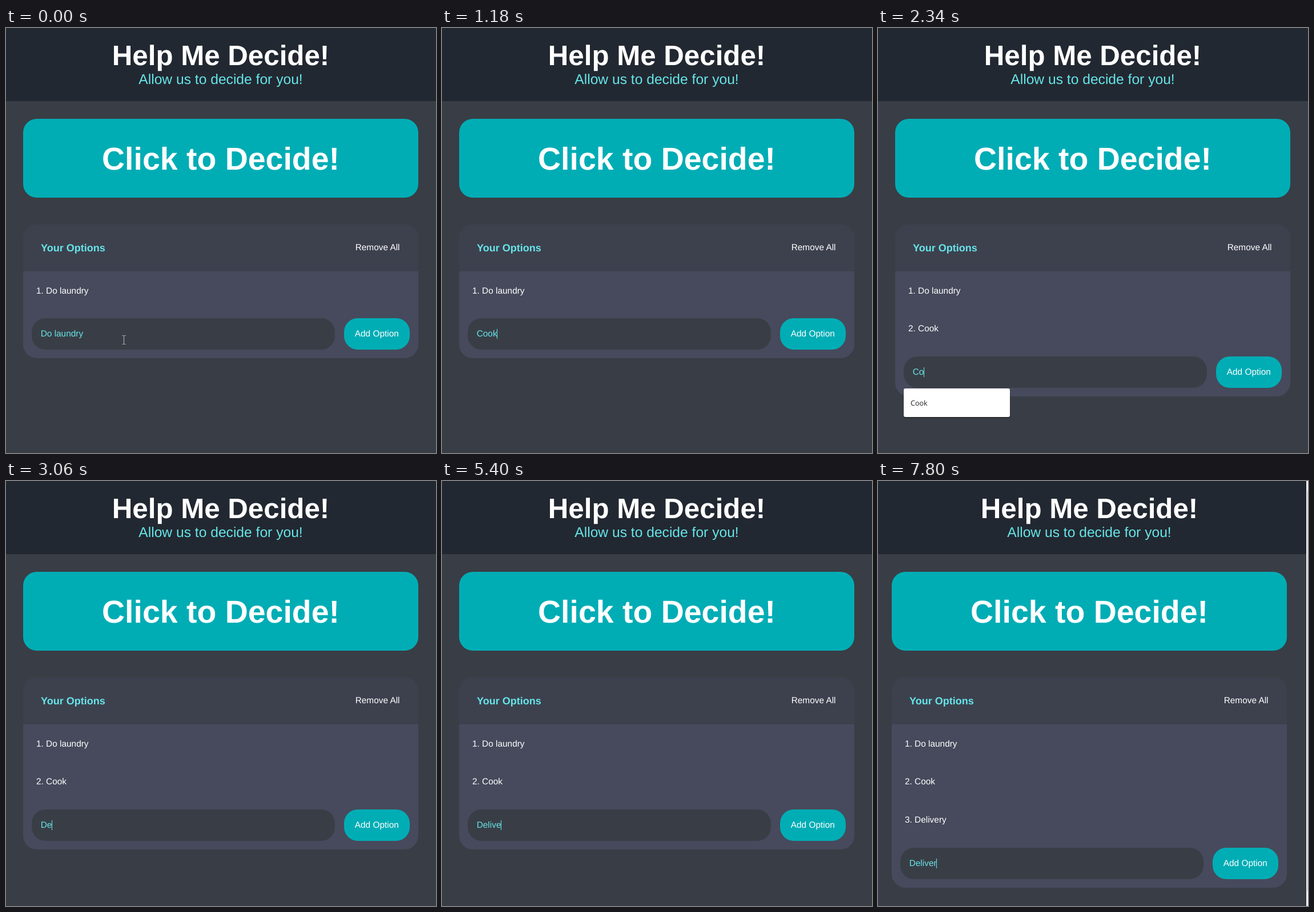
These frames come from a looping animation (753 by 744 pixels, 8000 ms). An HTML page:

```html
<!DOCTYPE html>
<html lang="en">
<head>
<meta charset="utf-8">
<title>Help Me Decide!</title>
<style>
  html { font-size: 15.4px; }
  html, body { margin: 0; width: 100%; height: 100%; overflow: hidden; background: #393d45; }
  svg { display: block; width: 753px; height: 744px; }
  text {
    font: 1rem "Liberation Sans", Arial, sans-serif;
    text-rendering: geometricPrecision;
    white-space: pre;
    fill: #fff;
  }
  .bold { font-weight: bold; }
  .mid { text-anchor: middle; }
  .cyan { fill: #66e5e9; }
  .menu text { font: 12.5px "Open Sans", "Noto Sans", sans-serif; fill: #222; }
</style>
</head>
<body>
<svg viewBox="0 0 753 744">
  <defs><clipPath id="picked"><rect id="pickedBox" y="527" height="18"/></clipPath></defs>
  <rect width="753" height="744" fill="#393d45"/>
  <rect width="753" height="128" fill="#222831"/>
  <g id="page">
    <text class="bold mid" x="376" y="65" style="font-size:3.2rem">Help Me Decide!</text>
    <text class="mid cyan" x="376" y="98" style="font-size:1.6rem">Allow us to decide for you!</text>
    <rect x="30" y="159" width="692" height="138" rx="24" fill="#00adb5"/>
    <text class="bold mid" x="376" y="248" style="font-size:3.6rem">Click to Decide!</text>

    <rect id="panel" x="30" y="344" width="692" rx="24" fill="#464a5c"/>
    <path d="M30 426V368a24 24 0 0 1 24-24H698a24 24 0 0 1 24 24V426z" fill="#3d414e"/>
    <text class="bold cyan" x="61" y="391" style="font-size:1.17rem">Your Options</text>
    <text x="611.7" y="389">Remove All</text>
    <g id="list"></g>

    <g id="form">
      <rect x="45" y="508" width="531" height="55" rx="24" fill="#393e46"/>
      <rect x="592" y="508" width="115" height="55" rx="24" fill="#00adb5"/>
      <text x="610.8" y="540">Add Option</text>
      <text id="field" class="cyan" x="60.7" y="540"></text>
      <path id="squiggle" fill="none" stroke="#d8343c"/>
      <rect id="caret" y="527" width="1" height="17" fill="#66e5e9"/>
      <g id="selection" clip-path="url(#picked)">
        <rect x="55" y="527" width="90" height="18" fill="#0078d7"/>
        <text x="60.7" y="540">Do laundry</text>
      </g>
      <g class="menu" id="menu">
        <rect id="menuShade" x="44.5" y="564.5" width="187" rx="4" fill="#000" opacity=".3"/>
        <rect id="menuBox" x="45" y="564" width="186" rx="3" fill="#fff"/>
        <text id="entry0" x="57" y="594"></text>
        <text id="entry1" x="57" y="628"></text>
      </g>
    </g>
    <path id="pointer" d="M-3-7.5H-1Q0-7.5 0-6.5Q0-7.5 1-7.5H3M0-6.5V6.5M-3 7.5H-1Q0 7.5 0 6.5Q0 7.5 1 7.5H3" fill="none" stroke="#b9bcc0"/>
  </g>
  <g id="scrollbar">
    <rect x="750" width="3" height="744" fill="#f1f1f1"/>
    <rect x="752" y="17" width="1" height="701" fill="#c1c1c1"/>
  </g>
</svg>
<script>
const LOOP = 8000, ROW = 67, LEFT = 60.7;
const $ = id => document.getElementById(id);
const options = ["Do laundry", "Cook", "Delivery"];

// [time, field text, caret shown, option count, suggestions]
const steps = [
  [0, "Do laundry", 0, 1],
  [60, "Do laundry", 0, 1, "Do laundry"],
  [860, "C", 1, 1],
  [900, "C", 1, 1, "Cook", "Clean"],
  [980, "Co", 1, 1, "Cook", "Clean"],
  [1010, "Co", 1, 1, "Cook"],
  [1090, "Coo", 1, 1, "Cook"],
  [1180, "Cook", 1, 1],
  [1400, "Cook", 1, 2],
  [1700, "Cook", 0, 2],
  [1850, "Coo", 0, 2],
  [1880, "Coo", 0, 2, "Cook"],
  [2220, "Coo", 1, 2, "Cook"],
  [2340, "Co", 1, 2, "Cook"],
  [2390, "", 1, 2],
  [2730, "D", 1, 2],
  [2780, "D", 1, 2, "Do laundry"],
  [3060, "De", 1, 2],
  [3120, "Del", 1, 2],
  [3210, "Deli", 1, 2],
  [3300, "Deliv", 1, 2],
  [3490, "Delive", 1, 2],
  [3540, "Deliveyr", 1, 2],
  [3720, "Deliveyr ", 1, 2],
  [3880, "Deliveyr F", 1, 2],
  [4030, "Deliveyr Fo", 1, 2],
  [4180, "Deliveyr Foo", 1, 2],
  [4270, "Deliveyr Food", 1, 2],
  [4760, "Deliveyr Food", 0, 2],
  [4820, "Deliveyr Foo", 1, 2],
  [5250, "Deliveyr Fo", 1, 2],
  [5280, "Deliveyr F", 1, 2],
  [5310, "Deliveyr ", 1, 2],
  [5340, "Deliveyr", 1, 2],
  [5370, "Delivey", 1, 2],
  [5400, "Delive", 1, 2],
  [5740, "Delivey", 1, 2],
  [5830, "Delive", 1, 2],
  [6360, "Delive", 0, 2],
  [6400, "Deliver", 1, 2],
  [6440, "Delivery", 1, 2],
  [6970, "Delivery", 0, 2],
  [7030, "Delivery", 0, 3],
  [7490, "Delivery", 1, 3],
  [7800, "Deliver", 1, 3]
];

$("list").innerHTML = options.map((name, i) =>
  `<text x="53" y="${465 + Math.floor(i * 66.5)}">${i + 1}. ${name}</text>`).join("");

const show = (id, on) => $(id).setAttribute("display", on ? "inline" : "none");
const set = (id, name, value) => $(id).setAttribute(name, value);

function textWidth(text) {
  $("field").textContent = text;
  return text ? $("field").getComputedTextLength() : 0;
}

function drawMenu(entries) {
  const height = 16 + 34 * entries.length;
  show("menu", entries.length);
  set("menuShade", "height", height + 1.5);
  set("menuBox", "height", height);
  for (const i of [0, 1]) $("entry" + i).textContent = entries[i] || "";
}

// The pointer drags left across the field and selects the text it passes.
function drawDrag(t) {
  const progress = t < 30 ? 0 : Math.min(1, (Math.floor((t - 30) / 25) + 1) / 8);
  const x = 206 - 214 * progress;
  set("pointer", "transform", `translate(${Math.round(x) + .5} 546)`);
  show("pointer", progress < 1);

  const end = LEFT + textWidth("Do laundry");
  const start = Math.max(LEFT, Math.min(end, x));
  set("pickedBox", "x", start);
  set("pickedBox", "width", end - start);
  show("selection", t < 860 && start < end);
}

function draw(t) {
  const [, text, caret, count, ...entries] = steps.findLast(step => step[0] <= t);
  const scrolled = count === 3;
  const drop = (count - 1) * ROW;

  drawDrag(t);
  drawMenu(entries);

  const misspelt = t >= 3720 && text.startsWith("Deliveyr");
  show("squiggle", misspelt);
  if (misspelt) {
    const waves = Math.floor(textWidth("Deliveyr") / 4);
    set("squiggle", "d", `M${LEFT} 543` + "l2-1.5l2 1.5".repeat(waves));
  }

  set("caret", "x", Math.round(LEFT + textWidth(text) - .2));
  show("caret", caret);

  [...$("list").children].forEach((row, i) => row.setAttribute("display", i < count ? "inline" : "none"));
  set("panel", "height", 234 + drop);
  set("form", "transform", `translate(0 ${drop})`);
  set("page", "transform", `translate(${scrolled ? -6 : 0} 0)`);
  show("scrollbar", scrolled);
}

const begin = performance.now();
function tick() {
  draw((performance.now() - begin) % LOOP);
  requestAnimationFrame(tick);
}
tick();
</script>
</body>
</html>
```
